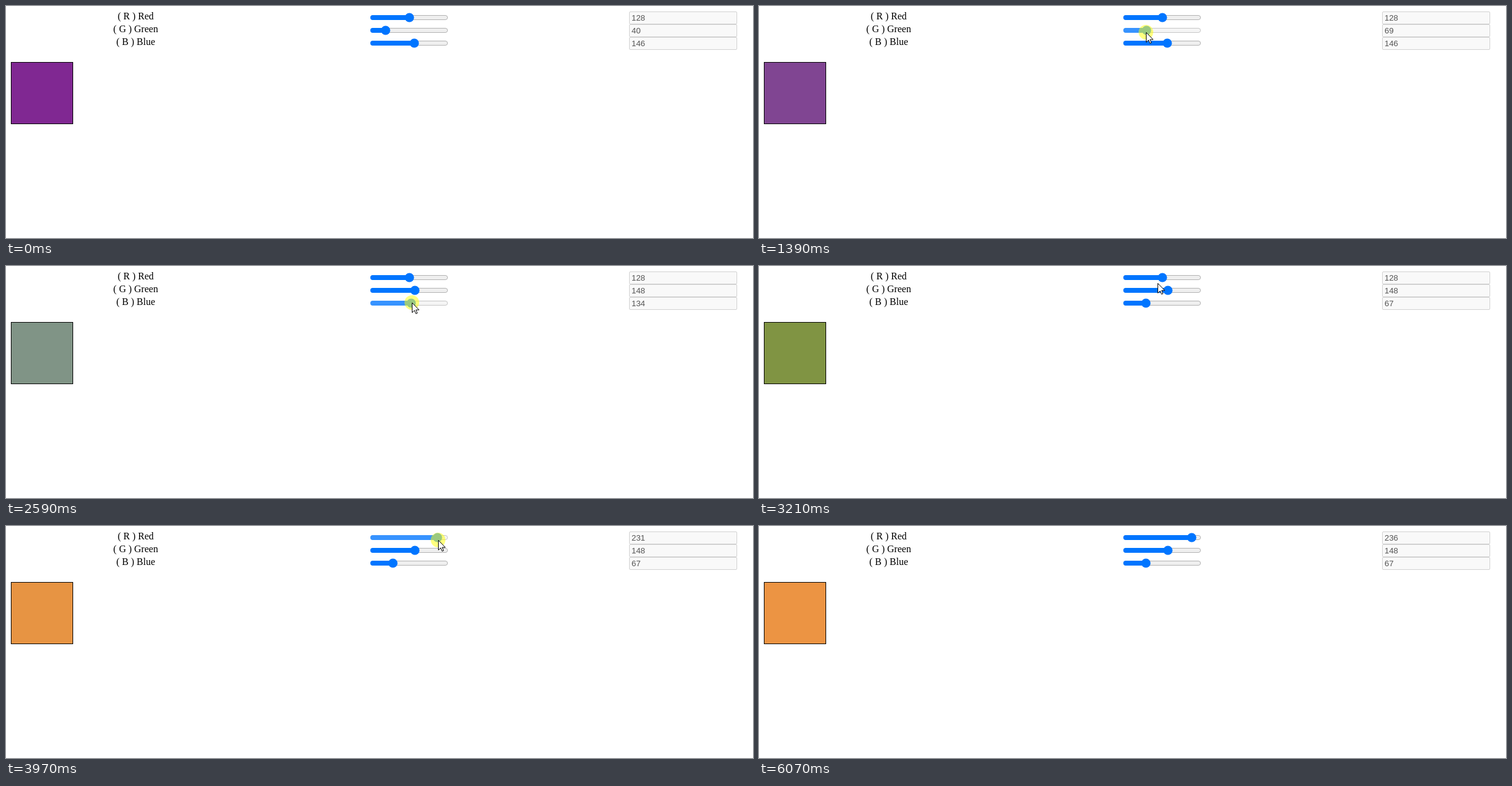
Animation, 1224 px wide and 381 px high, one loop 6.63 s. Source, as an HTML page:

```html
<!DOCTYPE html>
<html lang="en">
<head>
<meta charset="utf-8">
<title>RGB sliders</title>
<style>
  html, body { margin: 0; width: 100%; height: 100%; overflow: hidden; background: #fff; }
  svg { display: block; }
  .label { font: 16px "Liberation Serif", "Times New Roman", serif; text-anchor: middle; }
  .value { font: 13.333px "Liberation Sans", Arial, sans-serif; fill: #545454; }
  .field { fill: #f9f9f9; stroke: #d1d1d1; }
</style>
</head>
<body>
<svg id="stage" width="1224" height="381" viewBox="0 0 1224 381">
  <rect id="swatch" x="8.5" y="92.5" width="101" height="101" stroke="#000"/>
  <g id="rows"></g>
  <circle id="halo" r="12" fill="#ff0" fill-opacity=".5"/>
  <path id="pointer" d="M.5 .5V16.5L4.3 13L6.7 18.4L9 17.4L6.7 12.1H11.8Z" fill="#fff" stroke="#000"/>
</svg>
<script>
const LOOP = 6630;
const $ = id => document.getElementById(id);

const linear = p => p;
const easeOut = p => 1 - (1 - p) ** 2;
const easeInOut = p => p * p * (3 - 2 * p);

// Pointer moves: first step, last step, step count, target x, target y, easing
const moves = [
  [70, 70, 1, 954, 331, linear],
  [150, 700, 8, 620, 46, easeOut],
  [780, 780, 1, 620, 43, linear],
  [840, 840, 1, 621, 41, linear],
  [990, 990, 1, 621, 42, linear],
  [1080, 1080, 1, 622, 42, linear],
  [1240, 1620, 6, 669, 44, easeInOut],
  [1880, 1880, 1, 670, 48, linear],
  [1970, 2280, 5, 670, 62, easeOut],
  [2500, 2500, 1, 670, 60, linear],
  [2580, 2820, 4, 636, 60, easeInOut],
  [2990, 2990, 1, 635, 60, linear],
  [3140, 3140, 1, 642, 47, linear],
  [3210, 3210, 1, 653, 28, linear],
  [3290, 3370, 2, 662, 17, easeOut],
  [3750, 3970, 4, 708, 23, easeInOut],
  [4050, 4050, 1, 709, 23, linear],
  [4370, 4370, 1, 710, 23, linear],
  [4920, 5220, 5, 945, 271, easeInOut],
  [5460, 6070, 9, 1176, 384, linear]
];

const channels = [
  { label: "( R ) Red", start: 128, press: 3600, release: 4770 },
  { label: "( G ) Green", start: 40, press: 990, release: 1790 },
  { label: "( B ) Blue", start: 146, press: 2500, release: 2990 }
];

// Slider colours: accent, track, border
const looks = {
  idle: ["#0075ff", "#efefef", "#b2b2b2"],
  hover: ["#005cc8", "#e5e5e5", "#9e9e9e"],
  active: ["#3793ff", "#f5f5f5", "#c6c6c6"]
};

channels.forEach((c, i) => {
  c.y = 19 + 21 * i;
  const row = document.createElementNS("http://www.w3.org/2000/svg", "g");
  row.innerHTML = `
    <text class="label" x="212.5" y="${c.y + 3}">${c.label}</text>
    <rect class="track" x="597.5" y="${c.y - 3.5}" width="126" height="7" rx="3.5"/>
    <rect class="bar" x="597" y="${c.y - 4}" height="8" rx="4"/>
    <circle class="thumb" cy="${c.y}" r="7.6"/>
    <rect class="field" x="1021.5" y="${c.y - 9.5}" width="176" height="20" rx="1.5"/>
    <text class="value" x="1025" y="${c.y + 5}"></text>`;
  $("rows").append(row);
  for (const part of ["track", "bar", "thumb", "value"]) c[part] = row.querySelector("." + part);
});

function pointerAt(t) {
  let x = -50, y = -50;
  for (const [first, last, steps, toX, toY, ease] of moves) {
    if (t < first) break;
    const gap = (last - first) / (steps - 1 || 1);
    const done = gap ? Math.min(steps, 1 + Math.floor((t - first) / gap + 1e-6)) : 1;
    const p = ease(done / steps);
    x += (toX - x) * p;
    y += (toY - y) * p;
  }
  return { x: Math.round(x), y: Math.round(y) };
}

function valueAt(c, t) {
  const held = Math.max(c.press, Math.min(t, c.release));
  const travel = pointerAt(held).x - pointerAt(c.press).x;
  return Math.floor(c.start + travel * 255 / 113);
}

function draw(t) {
  const { x, y } = pointerAt(t);
  const pressed = channels.find(c => t >= c.press && t < c.release);

  const rgb = channels.map(c => {
    const over = x >= 596 && x < 725 && y >= c.y - 8 && y < c.y + 8;
    const state = c === pressed ? "active" : over && !pressed ? "hover" : "idle";
    const [accent, track, border] = looks[state];
    const value = valueAt(c, t);
    const thumbX = Math.round(604.3 + value / 255 * 113);
    c.track.setAttribute("fill", track);
    c.track.setAttribute("stroke", border);
    c.bar.setAttribute("fill", accent);
    c.bar.setAttribute("width", thumbX + 4 - 597);
    c.thumb.setAttribute("fill", accent);
    c.thumb.setAttribute("cx", thumbX);
    c.value.textContent = value;
    return value;
  });

  $("swatch").setAttribute("fill", `rgb(${rgb})`);
  $("pointer").setAttribute("transform", `translate(${x} ${y})`);
  $("halo").setAttribute("transform", `translate(${x} ${y})`);
  $("halo").setAttribute("visibility", pressed ? "visible" : "hidden");
}

const began = performance.now();
function tick() {
  draw((performance.now() - began) % LOOP);
  requestAnimationFrame(tick);
}
tick();
</script>
</body>
</html>
```
